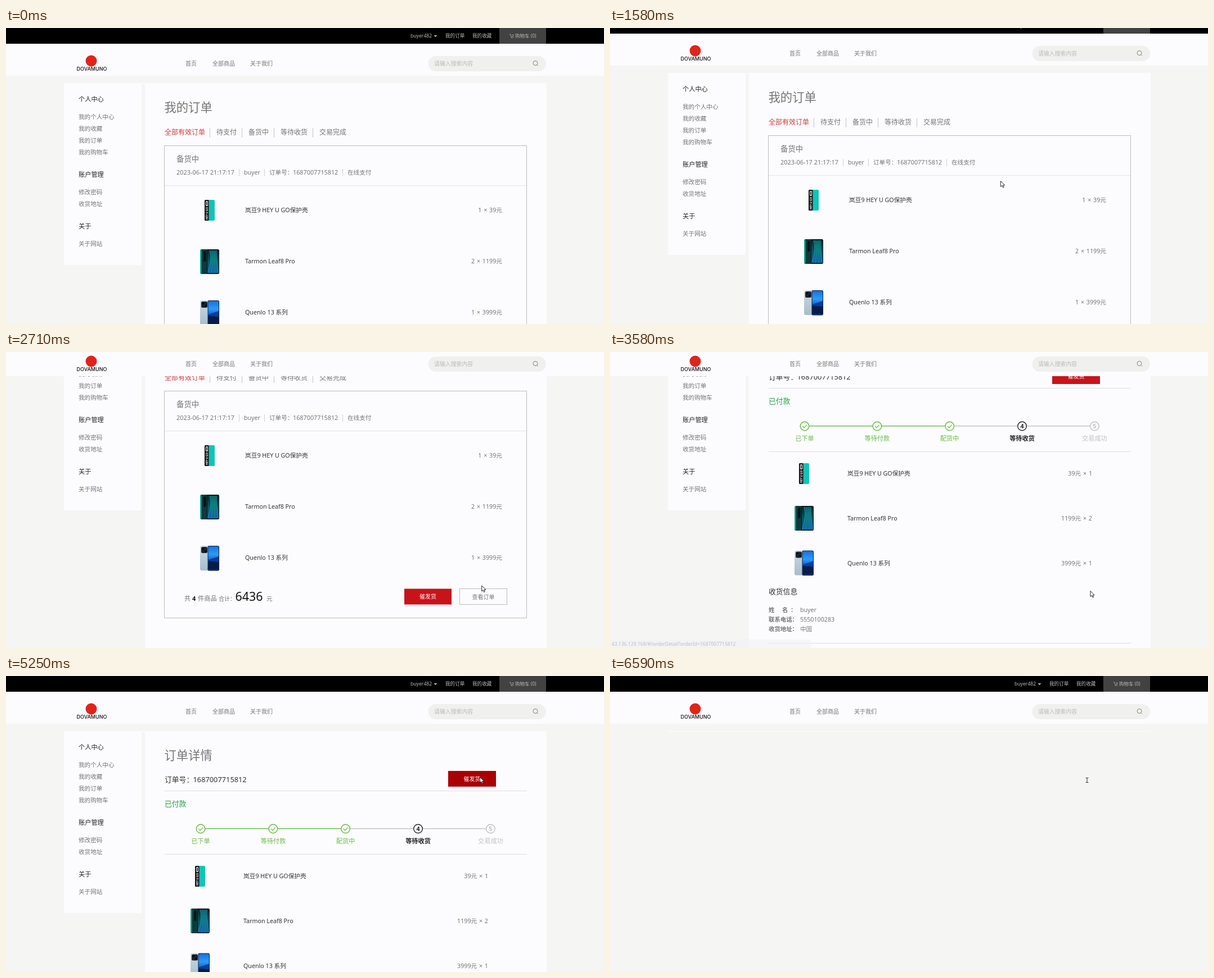
Write an HTML page that moves like this. It is 1063 by 527 pixels and loops after 8 s.

```html
<!DOCTYPE html>
<html lang="zh-CN">
<head>
<meta charset="utf-8">
<title>我的订单</title>
<style>
html, body { margin: 0; width: 100%; height: 100%; overflow: hidden; background: #f5f5f4; }
svg { display: block; width: 1063px; height: 527px; }
text { font-family: "Noto Sans", "Noto Sans CJK SC", "Noto Sans CJK", sans-serif; white-space: pre; }
</style>
</head>
<body>
<svg id="stage" viewBox="0 0 1063 527"></svg>
<script>
const GRAY = '#757575', DARK = '#333', WHITE = '#fcfcfe', RED = '#c9131b';
const GREEN = '#67bb45', PALE = '#c0c0c2', RULE = '#dededf';
const END = 'text-anchor="end" word-spacing="1"', MID = 'text-anchor="middle"', BOLD = 'font-weight="700"';

// Text placed by the vertical centre of its line, baseline on a whole pixel
const T = (x, cy, s, size = 10.6, fill = GRAY, more = '') =>
  `<text x="${x}" y="${Math.round(cy + size * .37)}" font-size="${size}" fill="${fill}" ${more}>${s}</text>`;
const R = (x, y, w, h, fill, more = '') =>
  `<rect x="${x}" y="${y}" width="${w}" height="${h}" fill="${fill}" ${more}/>`;
const P = (d, stroke, more = '') => `<path d="${d}" fill="none" stroke="${stroke}" ${more}/>`;
const rule = y => R(282, y, 644, 1, RULE);
const G = (id, body) => `<g id="${id}">${body}</g>`;

const products = ['岚豆9 HEY U GO保护壳', 'Tarmon Leaf8 Pro', 'Quenlo 13 系列'];
const prices = [39, 1199, 3999], counts = [1, 2, 1];

const phoneCase = (x, y) => `<g transform="translate(${x - 9} ${y - 18})">
  ${R(0, 0, 18, 37, '#10c4b8', 'rx="2"')}${R(0, 0, 7.5, 37, '#111', 'rx="1.5"')}
  ${R(2, 2, 4, 9, '#eee', 'rx="1.5"')}${R(3, 3.5, 2, 6, '#333')}
  <text transform="translate(5.8 35) rotate(-90)" font-size="4.7" font-weight="700" fill="#fff">HEY U GO</text></g>`;

const greenPhone = (x, y) => {
  let rays = '';
  for (let i = 0; i < 7; i++) {
    const foot = 14 + i * 3;
    rays += P(`M${17 + i * 2} 2Q${22 + i} 16 ${foot} 42`, i % 2 ? '#1c8fd0' : '#14b8a8', 'stroke-width=".9"');
  }
  return `<g transform="translate(${x - 17} ${y - 22})">
    ${R(0, 0, 20, 44, '#0b3b3c', 'rx="3"')}${R(0, 1, 2.5, 42, '#1aa596', 'rx="1.2"')}
    ${R(6, 3, 4.5, 19, '#061314', 'rx="2"')}${R(12, 0, 22, 44, '#0a1418', 'rx="2.5"')}
    ${R(13, 1.5, 20, 41, 'url(#ray)', 'rx="1.5"')}${rays}</g>`;
};

const bluePhone = (x, y) => `<g transform="translate(${x - 17} ${y - 22})">
  ${R(0, 0, 20, 44, 'url(#silver)', 'rx="3"')}${R(2, 2, 11, 11, '#1a232b', 'rx="2.5"')}
  <circle cx="5.5" cy="5.5" r="1.8" fill="#070b10"/><circle cx="9.8" cy="9.5" r="1.8" fill="#070b10"/>
  ${R(13.5, 0, 20.5, 44.5, '#0a1c40', 'rx="2.5"')}${R(14.5, 1, 18.5, 42.5, 'url(#sky)', 'rx="1.5"')}
  <path d="M14.5 25L33 19V29L14.5 27Z" fill="#0b3c9c"/><path d="M14.5 27L33 29V42H14.5Z" fill="#071c4a"/></g>`;

const photos = (x, ys) => [phoneCase, greenPhone, bluePhone].map((draw, i) => draw(x, ys[i])).join('');

const button = (x, y, w, label, id) => R(x, y, w, 28, RED, `id="${id}"`) + T(x + w / 2, y + 14, label, 10, '#fff', MID);

function sidebar() {
  const heads = [[127, '个人中心'], [260.5, '账户管理'], [352.5, '关于']];
  const links = [[158.5, '我的个人中心'], [179.5, '我的收藏'], [200.5, '我的订单'], [221.5, '我的购物车'],
    [292, '修改密码'], [313.5, '收货地址'], [384, '关于网站']];
  return R(103, 98, 138, 324, WHITE) +
    heads.map(([y, s]) => T(129, y, s, 11.2, '#222')).join('') +
    links.map(([y, s]) => T(129, y, s)).join('');
}

function orders() {
  const tabs = [[282, '全部有效订单'], [374, '待支付'], [431, '备货中'], [488, '等待收货'], [557, '交易完成']];
  const rows = [324, 415, 506];
  return T(281.5, 141, '我的订单', 21.3) +
    tabs.map(([x, s], i) => T(x, 186, s, 12, i ? GRAY : '#d23a40')).join('') +
    [362, 419, 476, 545].map(x => R(x, 178, 1, 17, '#c4c4c4')).join('') +
    R(281.5, 209.5, 644, 404, 'none', 'stroke="#bcbcbe"') + R(282, 280, 643, 1, '#e4e4e5') +
    T(303, 233.5, '备货中', 13.4) + T(303, 257, '2023-06-17 21:17:17', 10.9) +
    T(423, 257, 'buyer') + T(468, 257, '订单号：') + T(510, 257, '1687007715812', 10.8) + T(607, 257, '在线支付') +
    [414, 459, 598].map(x => R(x, 251, 1, 13, '#d0d0d0')).join('') +
    photos(362, [324, 416, 507]) +
    rows.map((y, i) => T(425, y, products[i], 10.7, DARK) + T(882, y, `${counts[i]} × ${prices[i]}元`, 10.7, GRAY, END)).join('') +
    T(317, 579, '共', 11) + T(331, 579, '4', 11, '#111', 'font-weight="600"') + T(341, 579, '件商品', 11.2) +
    T(378, 579.5, '合计：', 10) + T(407.5, 575, '6436', 21.4, '#111') + T(463, 579.5, '元', 10.4) +
    button(708, 561.5, 84, '催发货', 'urge') +
    R(806.5, 561.5, 84, 28, 'none', 'stroke="#bcbcbe"') + T(848.5, 576, '查看订单', 10, GRAY, MID);
}

function step(label, i) {
  const x = 346 + i * 128.85, done = i < 3, ink = done ? GREEN : i == 3 ? '#222' : PALE;
  const mark = done ? P(`M${x - 3.6} 272l2.8 2.8 4.8-5.2`, ink, 'stroke-width="1.2"') : T(x, 272, i + 1, 10.6, ink, MID + ' ' + BOLD);
  const line = i < 4 ? R(x + 8, 271, 112.8, 1.4, i < 2 ? GREEN : PALE) : '';
  return line + `<circle cx="${x}" cy="272" r="7.8" fill="${WHITE}" stroke="${ink}" stroke-width="1.4"/>` + mark +
    T(x, 294, label, 11.2, ink, MID + (i == 3 ? ' ' + BOLD : ''));
}

function detail() {
  const rows = [356, 436, 516];
  const bold = (x, y, s) => T(x, y, s, 10.4, GRAY, BOLD);
  return T(281.5, 141, '订单详情', 21.3) + T(282, 184, '订单号：', 12.8, DARK) + T(332.5, 184, '1687007715812', 12.8, DARK) +
    button(786, 169, 85, '催发货', 'remind') +
    rule(204) + T(282, 227.5, '已付款', 12.8, '#22a040') +
    ['已下单', '等待付款', '配货中', '等待收货', '交易成功'].map(step).join('') + rule(317) +
    photos(345, [356, 436, 515.5]) +
    rows.map((y, i) => T(422, y, products[i], 10.7, DARK) + T(857, y, `${prices[i]}元 × ${counts[i]}`, 10.7, GRAY, END)).join('') +
    T(282, 566, '收货信息', 12.8, DARK) +
    bold(282, 599, '姓') + bold(306, 599, '名') + bold(321, 599, '：') + T(338, 599, 'buyer') +
    bold(282, 616, '联系电话：') + T(338, 616, '5550100283', 10.7) +
    bold(282, 633.5, '收货地址：') + T(338, 633.5, '中国') + rule(658);
}

function header() {
  const ink = '#b8b8b8';
  return R(0, 0, 1063, 28, '#000') + T(719, 14, 'buyer482', 8.6, ink) +
    `<path d="M760.5 13h6l-3 3.3z" fill="${ink}"/>` +
    T(781, 14, '我的订单', 8.6, ink) + T(829, 14, '我的收藏', 8.6, ink) +
    R(877, 0, 83, 28, '#424242') + P('M895 11h1.6l1.2 4.5h3.4l1-3.3h-3', ink, 'stroke-width=".8"') +
    `<circle cx="898.3" cy="17.3" r=".7" fill="${ink}"/><circle cx="901" cy="17.3" r=".7" fill="${ink}"/>` +
    T(905, 14, '购物车 (0)', 8.5, ink) +
    R(0, 28, 1063, 57, WHITE) + '<circle cx="151.5" cy="58.5" r="10" fill="#e2231a"/>' +
    T(152.5, 73, 'DOVAMUNO', 9, '#111', MID + ' style="font-family:Inter,sans-serif;font-weight:500"') +
    T(319, 63, '首页', 10) + T(367, 63, '全部商品', 10) + T(434, 63, '关于我们', 10) +
    R(750.5, 50, 209.5, 27, '#f0f0ef', 'rx="13.5"') + T(761, 63, '请输入搜索内容', 9.9, '#bababd') +
    `<circle cx="941" cy="62.5" r="4" fill="none" stroke="#808080"/>` + P('M943.8 65.5l2 2', '#808080');
}

const gradient = (id, ...colors) => `<linearGradient id="${id}" x2="0" y2="1">` +
  colors.map((c, i) => `<stop offset="${i / (colors.length - 1)}" stop-color="${c}"/>`).join('') + '</linearGradient>';

stage.innerHTML = '<defs>' + gradient('ray', '#08262e', '#0b5564', '#1450a0') +
  gradient('silver', '#ccd9e2', '#a8bccb') + gradient('sky', '#1a6fe0', '#2b9cf4', '#0c4fc4', '#0a2f80') + '</defs>' +
  R(0, 0, 1063, 527, '#f5f5f4') +
  G('page', R(103, 98, 857, 1, WHITE) +
    G('content', sidebar() + R(247, 98, 714, 700, WHITE) + G('list', orders()) + G('info', detail()))) +
  G('bar', header()) +
  G('status', R(0, 512, 357, 15, '#f3f3f6') +
    T(3, 520, '43.136.129.168/#/orderDetail?orderId=1687007715812', 8.55, '#999')) +
  G('arrow', '<path d="M0 0V10L2.3 7.9 4 11.5 5.6 10.8 4 7.4H7.2Z" fill="#fff" stroke="#111" stroke-width=".9"/>') +
  G('beam', P('M845.5 181.5H850.5M848 181.5V189.5M845.5 189.5H850.5', '#333'));

const el = id => document.getElementById(id);
const ramp = (t, a, b) => Math.min(1, Math.max(0, (t - a) / (b - a)));

// Eased value along [time, value, ...] keys
function track(keys, t, k = 1) {
  let i = 0;
  while (i < keys.length - 2 && t > keys[i + 1][0]) i++;
  const [a, b] = [keys[i], keys[i + 1]], p = ramp(t, a[0], b[0]);
  return a[k] + (b[k] - a[k]) * p * p * (3 - 2 * p);
}

const scrollKeys = [[1410, 0], [2000, 87], [2080, 87], [2400, 140], [3610, 140], [4120, 3], [4200, 0]];
const mouseKeys = [[40, 846, 14], [830, 676, 260], [910, 683, 269], [1160, 683, 269], [1330, 693.5, 271.5],
  [1960, 696.5, 274.5], [2080, 696.5, 274.5], [2790, 851, 421], [2830, 854, 425.5], [3610, 854, 425.5],
  [4120, 720.5, 325], [4290, 783, 268], [4800, 846, 181], [5040, 846, 180], [5250, 842.5, 180], [5710, 842.5, 180], [5750, 844, 180]];

function draw() {
  const t = performance.now() % 8000;
  const scroll = Math.round(track(scrollKeys, t));
  const move = (id, x, y) => el(id).setAttribute('transform', `translate(${x} ${y})`);
  const fade = (id, o) => el(id).setAttribute('opacity', o);

  move('page', 0, -scroll);
  move('bar', 0, -Math.min(scroll, 42));
  move('arrow', track(mouseKeys, t), track(mouseKeys, t, 2));
  fade('list', t < 3120 ? 1 : 0);
  fade('info', ramp(t, 3120, 3290));
  fade('content', 1 - ramp(t, 5960, 6500));
  fade('status', ramp(t, 3000, 3080) - ramp(t, 3500, 3700));
  fade('arrow', t >= 40 && t < 5960 ? 1 : 0);
  fade('beam', t >= 5960 ? 1 : 0);

  const h = ramp(t, 4550, 4750);
  el('remind').setAttribute('fill', `rgb(${201 - 32 * h},${19 - 19 * h},${27 - 23 * h})`);
  requestAnimationFrame(draw);
}
draw();
</script>
</body>
</html>
```
